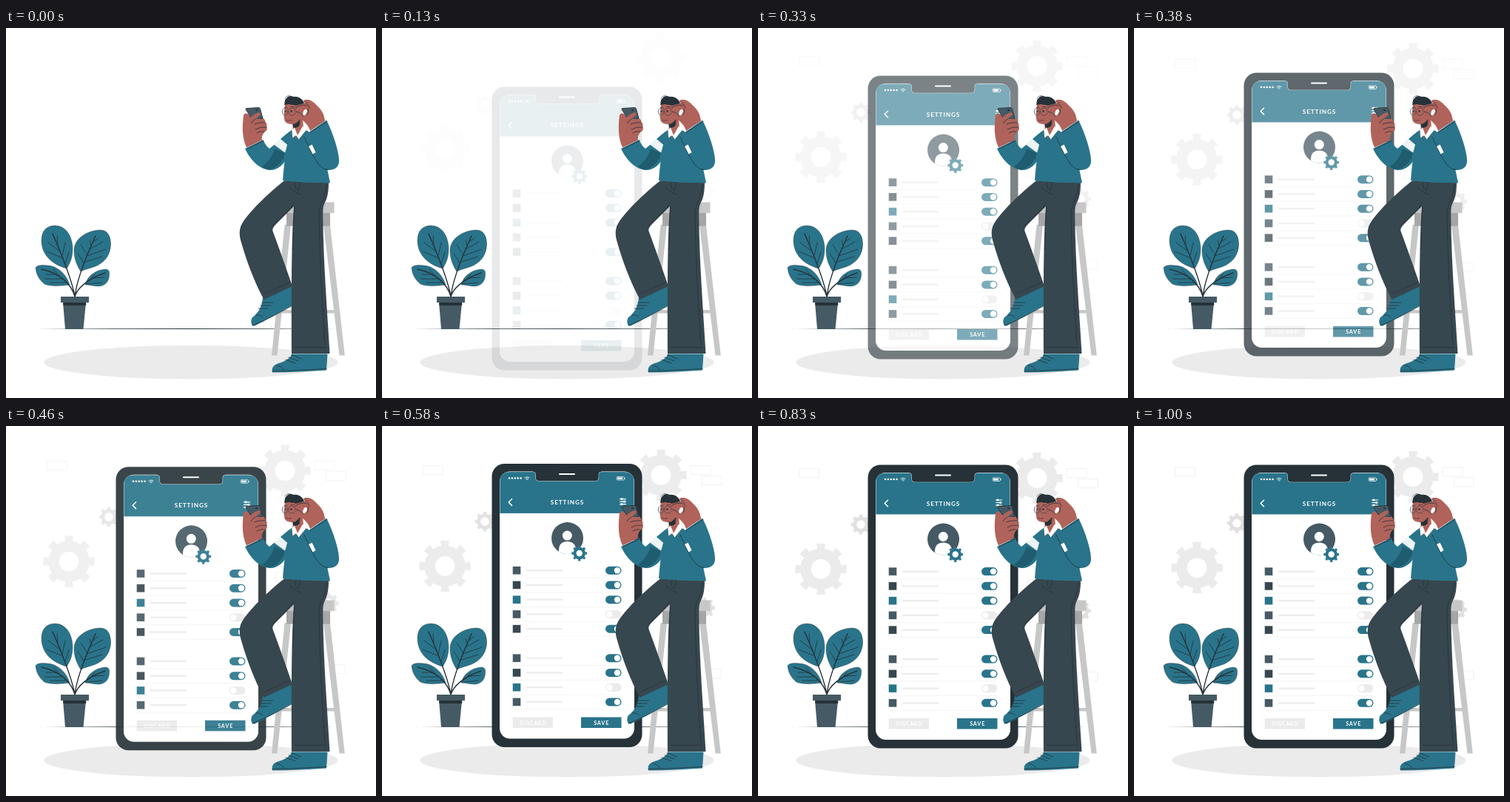
Recreate the animation shown at these times as an HTML page. Size 500 by 500 pixels, loop 1.04 s.

```html
<!DOCTYPE html>
<html lang="en">
<head>
<meta charset="utf-8">
<title>Phone settings</title>
<style>
  html, body { margin: 0; width: 100%; height: 100%; overflow: hidden; background: #fff; }
  svg { display: block; width: 100vw; height: 100vh; }
  text { font-family: Lato, Inter, sans-serif; font-weight: 700; fill: #fff; text-anchor: middle; }
  .blue { fill: #29748b; }
  .dark { fill: #263238; }
  .slate { fill: #455a64; }
  .trouser { fill: #37474f; }
  .skin { fill: #b0635b; }
  .white { fill: #fff; }
  .pale { fill: #ebebeb; }
  .line { fill: none; stroke: #263238; stroke-width: .8; stroke-linecap: round; stroke-linejoin: round; }
  .icon { fill: none; stroke: #fff; stroke-width: 1.2; stroke-linecap: round; stroke-linejoin: round; }
  .box { fill: none; stroke: #e8e8e8; stroke-width: .6; }
</style>
</head>
<body>
<svg viewBox="0 0 500 500">
  <g id="backdrop"></g>

  <path class="dark" d="M41 406.5Q245 405.4 449 406.5Q245 407.6 41 406.5"/>
  <ellipse class="pale" cx="250" cy="451.7" rx="198.5" ry="22.8"/>

  <g id="plant">
    <path class="blue" stroke="#263238" stroke-width=".4" d="M82 325C64 320 48 308 48 287C48 273 56 267 66 267C82 267 90 283 90 299C90 311 86 319 82 325Z
      M101 329C94 318 92 309 92 301C92 285 108 274 127 273C137 273 141 280 141.500 291C142 308 131 318 121 322C113 325 107 326 101 329Z
      M86 347C72 349 58 349 52 346C45 340 41 334 40 324C42 320 50 320 57 321C70 322 82 333 86 347Z
      M107 347C110 335 121 327 134 326C139 326 140 329 139.500 334C139 343 134 348 126 349C119 349 113 347 107 347Z"/>
    <path class="line" style="stroke-width:1.4" d="M93 363C90 345 82 322 63 278M93 363C95 345 104 318 121 281M93 363C88 345 72 331 48 326M93 363C96 352 110 339 134 331"/>
    <path class="line" d="M70 294L69 281M73 302L57 290M77 311L55 302M76 308L80 290M80 318L85 303
      M115 295L113 287M110 307L101 293M105 317L97 305M113 299L131 289M109 308L135 299M104 317L130 309M117 290L125 284
      M68 333L54 333M76 339L52 339M81 344L60 344M73 336L64 326M113 342L120 333M108 346L130 344M118 338L133 337"/>
    <path class="slate" d="M77 371H108L104.500 407H80Z"/>
    <path class="dark" d="M77 370H108.500L108 375H77.500Z"/>
    <path class="slate" d="M74 363H112V371H74Z"/>
  </g>

  <g id="phone">
    <rect class="dark" x="148.500" y="52.500" width="203" height="383" rx="17"/>
    <rect class="white" x="159" y="63" width="182" height="361" rx="14"/>
    <path class="blue" stroke="#fff" stroke-opacity=".35" stroke-width=".5" d="M159.300 119.500V77Q159.300 63.500 173 63.500H204Q207.500 63.500 207.500 67V71Q207.500 76 212.500 76H288Q293 76 293 71V67Q293 63.500 296.500 63.500H327Q340.700 63.500 340.700 77V119.500Z"/>
    <path class="dark" d="M204 63.200Q207.800 63.200 207.800 67V71Q207.800 75.700 212.500 75.700H288Q292.700 75.700 292.700 71V67Q292.700 63.200 296.500 63.200V60H204Z"/>
    <path class="icon" style="stroke-width:2" d="M240 66.500H260"/>
    <g id="dots" class="white"></g>
    <path class="icon" style="stroke-width:.9" d="M193 71.300Q196 69 199 71.300M194.500 72.900Q196 71.700 197.500 72.900M196 74.200V74.300"/>
    <rect class="icon" style="stroke-width:.7" x="317.300" y="70" width="10" height="4.500" rx="1"/>
    <path class="white" d="M318.300 71H325V73.500H318.300ZM327.600 71.300H328.500V73.300H327.600Z"/>
    <path class="icon" style="stroke-width:1.500" d="M175.500 100.200L171.200 104.500L175.500 108.800"/>
    <path class="icon" d="M321.500 100H329.500M321.500 103.500H329.500M321.500 107H329.500"/>
    <g class="white"><circle cx="324" cy="100" r="1.600"/><circle cx="327.500" cy="103.500" r="1.600"/><circle cx="324" cy="107" r="1.600"/></g>
    <text x="250.500" y="107.500" font-size="8.200" letter-spacing=".9">SETTINGS</text>

    <clipPath id="face"><circle cx="250.500" cy="153" r="21.500"/></clipPath>
    <circle class="slate" cx="250.500" cy="153" r="21.500"/>
    <g class="white" clip-path="url(#face)">
      <circle cx="250.300" cy="149.500" r="6.500"/>
      <path d="M239 176V169C239 161 244 157.500 250.300 157.500S262 161 262 169V176Z"/>
    </g>
    <g id="badge"></g>
    <g id="rows"></g>
    <path class="pale" d="M176.700 395H231V409.500H176.700Z"/>
    <path class="blue" d="M269 395H323.500V409.500H269Z"/>
    <text x="204.200" y="405" font-size="7.200" letter-spacing=".7">DISCARD</text>
    <text x="296.700" y="405" font-size="7.200" letter-spacing=".9">SAVE</text>
  </g>

  <g id="stool">
    <path fill="#c7c7c7" d="M376.500 266H385L366.500 442.500H359ZM429 266H438L457.800 442.500H450.500ZM366 381H446V385.500H366ZM377 235.500H443.500V250H377Z"/>
    <path fill="#a6a6a6" d="M379 250H438V267.500H379Z"/>
  </g>

  <g id="person">
    <path class="blue" d="M387 345L386 375.500C368 385 350 396 336 402.500C331 404 330 395 333 391C341 385 346 377 347 364Z"/>
    <path class="line" d="M333 402C350 395 370 385 385.500 376M346 371L361 371M344 375L358 375M341 379L354 379M338 388Q344 387 347 391"/>
    <path class="trouser" d="M376.500 206C356 222 333 244 321 261C314 271 315 280 318 290C325 315 336 344 348.500 367L387 349C379 326 369 297 361 276C359 271 362 268 366 264L390 240L400 208Z"/>
    <path class="blue" d="M386 440.500H434.500L433 462.500C410 464 385 465.500 360 465.500C358 457 364 454 372 452C380 449 385 445 386 440.500Z"/>
    <path class="line" d="M360 463.500C385 463.500 410 461.500 433 460.500M382 445L395 450M378 448L391 453M386 442L399 447M366 456Q373 457 375 462"/>
    <path class="trouser" d="M382 206L436 208.500C436 226 433 232 430 238C428 243 428.300 250 428.300 256C429 320 434 380 437.500 440H386C386 380 385 300 389 240Z"/>
    <path class="line" d="M390 431.500H433M423 250C424 320 428 380 431 428M423 250C423 238 432 230 433 212M384 216Q390 223 399 225M391 208C389 214 392 218 395 219C397 215 398 212 397 208M390 242Q388 270 387.500 300M390 236Q383 246 361 267M349 359.500L383 344"/>

    <path class="blue" d="M323 163L347.500 151C350 157 353 161 356 163C365 156 375 145 386 138L383 171C376 184 368 192 357 192C342 191 330 178 323 163Z"/>
    <path fill="#205c6f" d="M363 163L377 169C375 180 366 190 355 191.500C351 191 348 189 346 187C354 182 360 173 363 163Z"/>
    <path class="white" opacity=".92" d="M370.500 149.500L380.500 158L377 168.500L362 157.500Z"/>
    <path class="blue" d="M388 136.500C382 143 378 160 374 206C394 209 416 209 438 209.500L433 185L408 139Z"/>
    <path class="blue" d="M402 146L433 124.500C440 138 450 165 450 180C450 188 444 192 436 192C428 192 422 185 415 172Z"/>
    <path class="line" d="M403 147C409 160 416 178 425 187Q429 191 435 191.500M410 141.500L434 126.500M326 163L348 152.500"/>
    <path class="white" d="M409 160L413.500 157.500L418.500 168L414.500 170.500Z"/>

    <path class="skin" d="M389 125L401 121L402 136L394 147L387 138Z"/>
    <path class="dark" d="M387 129.500L397.500 123L396.500 132Q392 136.500 388 134Z"/>
    <path class="skin" d="M377 103L400 101V115C398 124 393 130.500 386 130C379 129.500 376 127 376 122L375.500 117Z"/>
    <path class="dark" d="M376 104C377 101 376 97 379 95C382 91 386 92 389 93C396 92 400 96 403 101L399 106L394 109C393 105 390 103 386 104C382 102 379 104 376 104Z"/>
    <path class="line" style="stroke-width:.6" d="M377 95Q380 90 385 92M376.500 107.500L380 107M385 106.500L390 106.500M379 124.500Q382 126 386 124.500"/>
    <g class="line" style="stroke:#37474f;stroke-width:.7"><ellipse cx="377" cy="113" rx="3.700" ry="5"/><circle cx="386.500" cy="113" r="5"/><path d="M391.500 112L396 111"/></g>
    <g class="dark"><circle cx="377.500" cy="112.500" r="1"/><circle cx="385.500" cy="112.500" r="1.200"/></g>
    <path class="white" d="M386 138L390 134.500L394 145L401 132.500L406 138L395.500 151L392 145.500L387 149Z"/>
    <path class="line" style="stroke-width:.5" d="M386 138L387 149L392 145.500L395.500 151L406 138"/>

    <path class="skin" d="M402 98C408 95 414 98 420 104.500C427 111 430 117 431 125.500L411 139C409 131 402 126 397 121C393 118 390 114 392 112L390 107C391 103 397 105 404 101Z"/>
    <ellipse class="white" cx="404" cy="114" rx="2.500" ry="4.200" transform="rotate(20 404 114)"/>
    <path class="line" d="M403 99Q408 102 410 108M391 108Q400 102 406 105M392 113Q398 114 402 119M408 109Q410 114 406 118"/>

    <path class="skin" d="M321 118C324 112 329 117 332 123L345 119C348 122 353 128 352.500 138C348 141 345 146 346 151.500L325 161.500C319 148 319 134 321 118Z"/>
    <path fill="#455a64" stroke="#263238" stroke-width=".8" d="M325 108.500L341 107.500Q343 107.500 343.500 109L347 122L334 126L324 110Q323.500 108.700 325 108.500Z"/>
    <circle class="dark" cx="338.500" cy="111" r="1.300"/>
    <path class="skin" d="M328 123Q336 115 342 114Q345 115 343 118L337 123H348Q351 124 350 127Q354 130 352 133Q354 137 350 140L338 143L329 136Z"/>
    <path class="line" d="M337 123Q333 125 331 129M350 128Q342 127 336 130M352 134Q344 133 337 137M349 140Q343 139 339 142"/>
  </g>
</svg>

<script>
const LOOP = 1040;
const $ = id => document.getElementById(id);

// A ring with eight teeth; the teeth are a dashed circle.
function gear(x, y, outer, hole, color) {
  const body = outer * .8, tooth = outer - body + 1;
  const ring = (r, w, extra = "") =>
    `<circle cx="${x}" cy="${y}" r="${r}" fill="none" stroke="${color}" stroke-width="${w}" ${extra}/>`;
  return ring((body + hole) / 2, body - hole) +
    ring(outer - tooth / 2, tooth, 'pathLength="8" stroke-dasharray=".45 .55" stroke-dashoffset=".225"');
}

const box = (x, y) => `<rect class="box" x="${x}" y="${y}" width="27" height="12"/>`;

function row(i) {
  const y = 196.6 + 19.75 * (i < 5 ? i : i + 1);
  const on = i !== 3 && i !== 7;
  const tone = ["slate", "trouser", "blue", "slate", "trouser"][i % 5];
  return `<rect class="${tone}" x="176.700" y="${y - 5.3}" width="10.600" height="10.600"/>
    <rect class="pale" x="195" y="${y - 1.1}" width="49" height="2.200"/>
    <path d="M177 ${y + 9.9}H323.500" stroke="#ebebeb" stroke-width=".5"/>
    <rect class="${on ? "blue" : "pale"}" x="302" y="${y - 5.5}" width="21.500" height="11" rx="5.500"/>
    <circle class="white" cx="${on ? 318 : 307.4}" cy="${y}" r="4.200"/>`;
}

$("backdrop").innerHTML =
  gear(85, 191.5, 34.7, 13.3, "#ebebeb") + gear(377, 68.7, 34.7, 13.5, "#ebebeb") +
  gear(139, 131.3, 13.3, 5.8, "#e0e0e0") + gear(436, 248, 14, 6, "#e0e0e0") +
  box(55.5, 56) + box(417, 56) + box(432, 70) + box(364.5, 206) + box(431.5, 331);
$("badge").innerHTML = '<circle class="white" cx="266.700" cy="173.500" r="8"/>' +
  gear(266.7, 173.5, 10.4, 4.2, "#29748b");
$("rows").innerHTML = Array.from({ length: 9 }, (_, i) => row(i)).join("");
$("dots").innerHTML = Array.from({ length: 5 }, (_, i) =>
  `<circle cx="${172 + 3.9 * i}" cy="72" r="1.300"/>`).join("");

const bezier = (a, b, s) => 3 * a * s * (1 - s) ** 2 + 3 * b * s * s * (1 - s) + s ** 3;

// Overshooting ease, solved for its curve parameter by bisection.
function ease(x) {
  if (x >= 1) return 1;
  let low = 0, high = 1;
  for (let i = 0; i < 30; i++) {
    const mid = (low + high) / 2;
    if (bezier(.36, .5, mid) < x) low = mid; else high = mid;
  }
  return bezier(-.01, 1.38, low);
}

function slideIn(id, progress, distance) {
  $(id).setAttribute("transform", `translate(0 ${(1 - progress) * distance})`);
  $(id).setAttribute("opacity", Math.min(1, Math.max(0, progress)));
}

function draw(t) {
  slideIn("backdrop", ease(t / 945), -30);
  slideIn("phone", ease(t / 770), 30);
}

let start;
function tick(now) {
  start ??= now;
  draw((now - start) % LOOP);
  requestAnimationFrame(tick);
}
draw(0);
requestAnimationFrame(tick);
</script>
</body>
</html>
```
